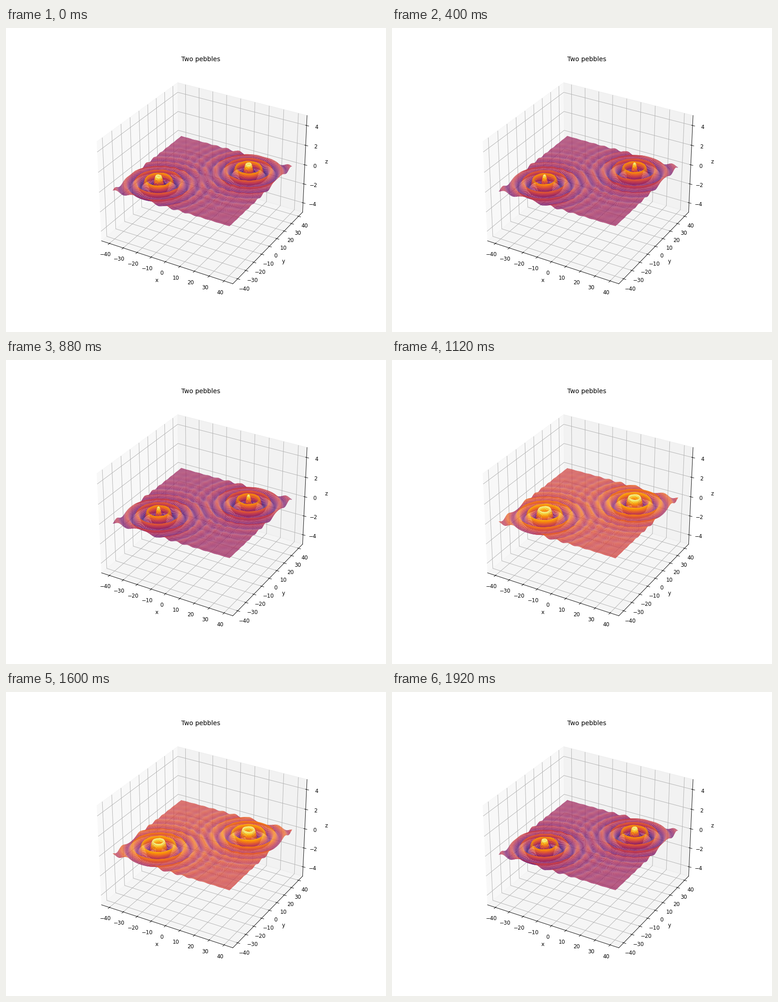
Recreate the animation shown at these times as a matplotlib script. Size 837 by 669 pixels, loop 2 s.

```python
import matplotlib.pyplot as plt
import numpy as np
from matplotlib.animation import FuncAnimation
from matplotlib.collections import QuadMesh
from mpl_toolkits.mplot3d import proj3d

WIDTH, HEIGHT, DPI = 837, 669, 83.7
FRAMES, INTERVAL = 25, 80
HALF, POINTS = 40, 200
PEBBLES = [(-20, -20), (20, 20)]
PHASE_STEP = 1.04
DAMPING = 0.08

# the tiny offset keeps the pixel size from rounding down
fig = plt.figure(figsize=((WIDTH + 1e-6) / DPI, (HEIGHT + 1e-6) / DPI), dpi=DPI)
ax = fig.add_subplot(projection="3d")
limit = HALF * 1.1 * 25 / 24
ax.set(title="Two pebbles", xlabel="x", ylabel="y", zlabel="z",
       xlim=(-limit, limit), ylim=(-limit, limit), zlim=(-5, 5))

# y runs from far to near, so cells are painted back to front
axis = np.linspace(-HALF, HALF, POINTS)
X, Y = np.meshgrid(axis, axis[::-1])
radii = [np.hypot(X - cx, Y - cy) for cx, cy in PEBBLES]
surface = None


def height(phase):
    return sum(np.exp(-DAMPING * r) * np.sin(r - phase) for r in radii)


def project(z):
    px, py, _ = proj3d.proj_transform(X.ravel(), Y.ravel(), z.ravel(), ax.get_proj())
    return np.stack([px, py], axis=-1).reshape(POINTS, POINTS, 2)


def cell_mean(z):
    return (z[1:, 1:] + z[1:, :-1] + z[:-1, 1:] + z[:-1, :-1]) / 4


def draw(i):
    global surface
    if surface is not None:
        surface.remove()
    z = height(PHASE_STEP * i)
    surface = QuadMesh(project(z), array=cell_mean(z), cmap="inferno",
                       antialiased=True, linewidth=0, zorder=1,
                       transform=ax.transData)
    fig.add_artist(surface)
    return [surface]


anim = FuncAnimation(fig, draw, frames=FRAMES, init_func=lambda: draw(0),
                     interval=INTERVAL, repeat=True, repeat_delay=0, blit=False)
plt.show()
```
